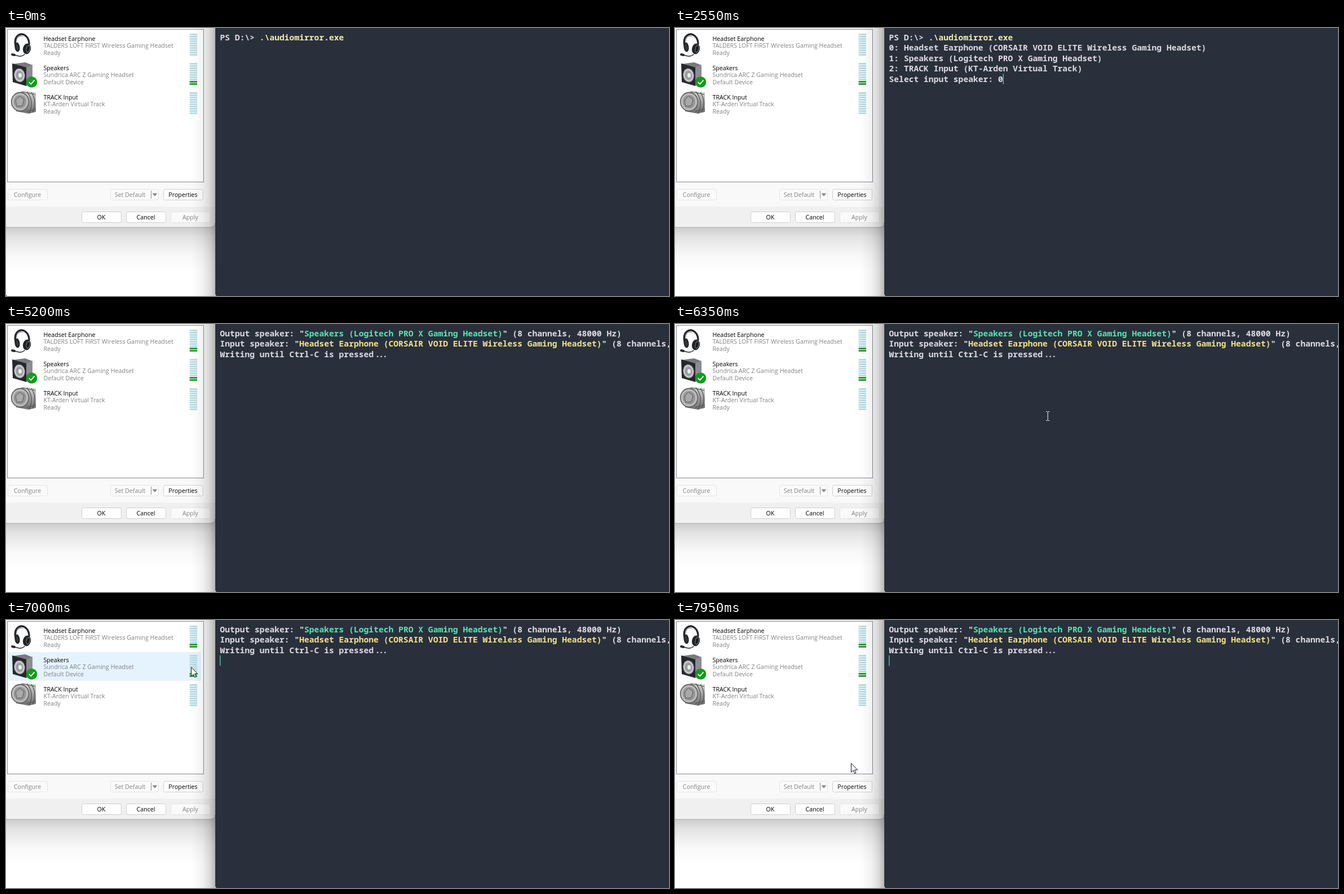
An HTML page for the animation above (8 s loop, 1176 px wide and 476 px high).

```html
<!DOCTYPE html>
<html lang="en">
<head>
<meta charset="utf-8">
<title>Audio mirror</title>
<style>
html, body { margin: 0; width: 100%; height: 100%; overflow: hidden; background: #fff; }
svg { display: block; width: 1176px; height: 476px; }
text { white-space: pre; }
.ui { font: 500 10.65px "Open Sans", "Noto Sans", sans-serif; fill: #000; }
.ui .dim { fill: #828282; }
.mid { text-anchor: middle; }
.term { font: 600 14.667px "Noto Sans Mono", "DejaVu Sans Mono", monospace; fill: #dedbe4; }
.btn { fill: #fdfdfd; stroke: #cfcfcf; }
.off { fill: #fafafa; stroke: #e4e4e4; }
</style>
</head>
<body>
<svg viewBox="0 0 1176 476">
  <defs>
    <linearGradient id="under" x2="0" y2="1">
      <stop offset="0" stop-opacity=".22"/><stop offset=".25" stop-opacity=".11"/>
      <stop offset=".6" stop-opacity=".035"/><stop offset="1" stop-opacity="0"/>
    </linearGradient>
    <linearGradient id="side">
      <stop offset="0" stop-opacity="0"/><stop offset=".45" stop-opacity=".05"/>
      <stop offset=".75" stop-opacity=".14"/><stop offset="1" stop-opacity=".3"/>
    </linearGradient>
    <linearGradient id="metal" x2="0" y2="1">
      <stop offset="0" stop-color="#d8d8d8"/><stop offset=".5" stop-color="#a2a2a2"/><stop offset="1" stop-color="#6c6c6c"/>
    </linearGradient>
  </defs>

  <rect y="350" width="372" height="84" fill="url(#under)"/>
  <path d="M0 0H371V346Q371 354 363 354H0Z" fill="#f9f9f9"/>
  <path d="M0 317.5H371V346Q371 354 363 354H0Z" fill="#f0f0f0"/>
  <path d="M362.5 0V317.5" stroke="#f1f1f1"/>
  <path d="M0 354H363Q371 354 371 346" fill="none" stroke="#a9a9a9"/>
  <rect x="2.5" y="2.5" width="348" height="271" fill="#fff" stroke="#828790"/>
  <rect id="hover" x="4" width="342" height="51" fill="#e5f3ff"/>

  <!-- headset -->
  <g fill="none" stroke="#25272b" stroke-linecap="round">
    <path d="M17 31C13 14 25 9 32 12C38 15 41 21 41 28" stroke-width="3.4"/>
    <path d="M19 24C18 16 25 13 30 15" stroke="#777"/>
    <ellipse cx="20" cy="34" rx="3" ry="7" fill="#3b3d42" stroke-width="3" transform="rotate(-8 20 34)"/>
    <ellipse cx="37" cy="37" rx="5.5" ry="8" fill="#1b1c1f" stroke-width="3" transform="rotate(12 37 37)"/>
    <ellipse cx="39" cy="37" rx="3.2" ry="6" stroke="#74777c" stroke-width="1.2" transform="rotate(12 39 37)"/>
    <path d="M33 47C27 52 21 50 14 47.5" stroke-width="1.6"/>
    <path d="M11 47L15 48" stroke-width="4"/>
  </g>
  <!-- loudspeaker -->
  <path d="M11 64L34 61L47 66L36 71Z" fill="#77797d"/>
  <path d="M36 70L47 65V97L36 103Z" fill="#8b8d92"/>
  <path d="M11 63L36 70V103L12 96Z" fill="#25272c"/>
  <ellipse cx="24" cy="84" rx="9.5" ry="12" fill="#c9cbcd" stroke="#6b6d71" transform="rotate(-8 24 84)"/>
  <ellipse cx="24" cy="84" rx="6.5" ry="8.5" fill="#9a9ca0" transform="rotate(-8 24 84)"/>
  <ellipse cx="25" cy="84" rx="3" ry="4" fill="#ececec"/>
  <circle cx="45.5" cy="96" r="9.8" fill="#139b1b"/>
  <path d="M40.8 96.2L44.2 99.6L50.5 92.6" fill="none" stroke="#fff" stroke-width="1.8"/>
  <!-- plug -->
  <path d="M14 119L28 112L53 114V149L40 152L18 148Z" fill="url(#metal)"/>
  <path d="M37 113Q51 130 41 152M45 114Q56 131 47 150M28 113L52 118M36 148L53 144" fill="none" stroke="#505050" stroke-width="1.2"/>
  <ellipse cx="25" cy="131" rx="15.5" ry="16.5" fill="#b4b4b4" stroke="#4c4c4c" stroke-width="1.3"/>
  <ellipse cx="25" cy="131" rx="12" ry="13" fill="#969696" stroke="#d6d6d6"/>
  <path d="M17 128L24 121L32 127L29 138L19 139Z" fill="#a9a9a9" stroke="#5a5a5a"/>

  <g id="items" class="ui"></g>
  <g id="meters"></g>
  <g id="buttons" class="ui"></g>
  <path d="M257.5 289V303" stroke="#8e8e8e"/>
  <path d="M259.5 293.5H268.5L264 299Z" fill="#8a8a8a"/>

  <rect id="shade" x="329" width="43" height="476" fill="url(#side)"/>
  <path d="M371.5 0H1176V476H374Q371.5 475 371.5 472Z" fill="#29303b"/>
  <path d="M372 0V472Q372 475 374 476" fill="none" stroke="#1e242c"/>
  <g id="screen" class="term"></g>
  <rect id="caret" width="1.3" height="18.6" fill="#4bd6a8"/>
  <path id="arrow" d="M.5 .5V16.5L4.2 13L6.6 18.6L9 17.5L6.6 12.2H11.7Z" fill="#fff" stroke="#111" stroke-linejoin="round"/>
  <path id="beam" d="M-3 -8H-1L0 -7L1 -8H3M0 -7V7M-3 8H-1L0 7L1 8H3" fill="none" stroke="#fff"/>
</svg>
<script>
const LOOP = 8000, STEP = 50, BLINK = 530;
const LEFT = 379.5, CELL = 8.8, ROW = 18.6, PITCH = 52;
const FOCUS = 880, MIRROR = 3750;
const $ = id => document.getElementById(id);

function add(parent, tag, attrs, text) {
  const el = document.createElementNS("http://www.w3.org/2000/svg", tag);
  for (const k in attrs) el.setAttribute(k, attrs[k]);
  if (text) el.textContent = text;
  return parent.appendChild(el);
}

// Device list
[
  ["Headset Earphone", "TALDERS LOFT FIRST Wireless Gaming Headset", "Ready"],
  ["Speakers", "Sundrica ARC Z Gaming Headset", "Default Device"],
  ["TRACK Input", "KT-Arden Virtual Track", "Ready"]
].forEach((item, i) => item.forEach((line, j) =>
  add($("items"), "text", { x: 66.5, y: 22.5 + i * PITCH + j * 12.7, class: j ? "dim" : "" }, line)));

const meters = [0, 1, 2].map(i => Array.from({ length: 10 }, (_, k) =>
  add($("meters"), "rect", { x: 325.7, y: 46 + i * PITCH - k * 4, width: 13.4, height: 3 })));

function button(label, x, y, on, w = 70) {
  add($("buttons"), "rect", { x: x + .5, y: y + .5, width: w, height: 19, rx: 3, class: on ? "btn" : "off" });
  add($("buttons"), "text", { x: x + 35, y: y + 14, class: on ? "mid" : "mid dim" }, label);
}
button("Configure", 3, 286, false);
button("Set Default", 185, 286, false, 85);
button("Properties", 279, 286, true);
button("OK", 134, 326, true);
button("Cancel", 213, 326, true);
button("Apply", 292, 326, false);

// Terminal: a line is a list of [text, colour, letter spacing]
const GREEN = "#55e6b6", YELLOW = "#f3e48a", COMMAND = "#f0efa8";
const head = "Headset Earphone (CORSAIR VOID ELITE Wireless Gaming Headset)";
const speak = "Speakers (Logitech PRO X Gaming Headset)";
const track = "TRACK Input (KT-Arden Virtual Track)";
const plain = s => [[s]];
const prompt = [["PS D:\\> "], [".\\audiomirror.exe", COMMAND]];
const choices = [head, speak, track].map((s, i) => plain(i + ": " + s));
const listed = [prompt, ...choices];
const answered = [...listed, plain("Select input speaker: 0")];
const report = [
  [['Output speaker: "'], [speak, GREEN], ['" (8 channels, 48000 Hz)']],
  [['Input speaker: "'], [head, YELLOW], ['" (8 channels, 48000 Hz)']]
];
const writing = [["Writing until Ctrl-C is pressed"], ["...", null, -2.2]];

// start, lines; the caret sits after the last line
const screens = [
  [0, [prompt]],
  [1700, [...listed, plain("Select input speaker: ")]],
  [2500, answered],
  [2650, [...answered, plain(""), ...choices, plain("Select output speaker: ")]],
  [3500, [...report, plain("")]],
  [3550, [...report, writing, plain("")]]
];

// time, x, y of the pointer
const path = [[6000, 972, 247], [6700, 350.5, 80], [7100, 324, 84], [7450, 318, 33],
  [7600, 317, 38], [7750, 317, 38], [7950, 312, 254]];

const show = (el, on) => el.style.display = on ? "" : "none";
const ease = f => f * f * (3 - 2 * f);

// The sound dips for a moment on each beat
const loudness = t => t % 800 >= 200 && t % 800 < 300 ? 1 : 2;

function pointer(t) {
  if (t < 150) return [-1, 473.5];
  const i = path.findLastIndex(p => p[0] <= t);
  if (i < 0) return null;
  const a = path[i], b = path[i + 1] || a;
  const f = ease((t - a[0]) / (b[0] - a[0] || 1));
  return [a[1] + (b[1] - a[1]) * f, a[2] + (b[2] - a[2]) * f];
}

let shown;
function drawScreen(lines) {
  if (lines === shown) return;
  shown = lines;
  $("screen").replaceChildren();
  lines.forEach((line, i) => {
    const row = add($("screen"), "text", { x: LEFT, y: 21.5 + i * ROW });
    for (const [text, fill, gap] of line)
      add(row, "tspan", { ...(fill && { fill }), ...(gap && { "letter-spacing": gap, dx: 2.6 }) }, text);
  });
}

function drawCaret(t, start, lines) {
  const row = lines.length - 1;
  const col = lines[row].reduce((n, part) => n + part[0].length, 0);
  const age = t - (start || FOCUS);
  $("caret").setAttribute("x", LEFT + col * CELL - .2);
  $("caret").setAttribute("y", 7 + row * ROW);
  show($("caret"), age >= 0 && Math.floor(age / BLINK) % 2 === 0);
}

function drawPointer(t) {
  const p = pointer(t), inTerm = p && p[0] > 372;
  show($("arrow"), p && !inTerm);
  show($("beam"), inTerm);
  if (p) $(inTerm ? "beam" : "arrow").setAttribute("transform", `translate(${p[0]} ${p[1]})`);
  const over = p && p[0] > 4 && p[0] < 346 && p[1] < 160;
  show($("hover"), over);
  if (over) $("hover").setAttribute("y", 5 + Math.floor((p[1] - 4) / PITCH) * PITCH);
}

function draw(t) {
  const [start, lines] = screens.findLast(s => s[0] <= t);
  drawScreen(lines);
  drawCaret(t, start, lines);
  drawPointer(t);
  $("shade").setAttribute("opacity", t < FOCUS ? .9 : 1);
  const level = loudness(t);
  [t < MIRROR ? 0 : level, level, 0].forEach((n, i) =>
    meters[i].forEach((seg, k) => seg.setAttribute("fill", k < n ? "#279a2d" : "#b9dce3")));
}

const begin = performance.now();
function tick() {
  const t = (performance.now() - begin) % LOOP;
  draw(Math.floor(t / STEP) * STEP);
  requestAnimationFrame(tick);
}
tick();
</script>
</body>
</html>
```
